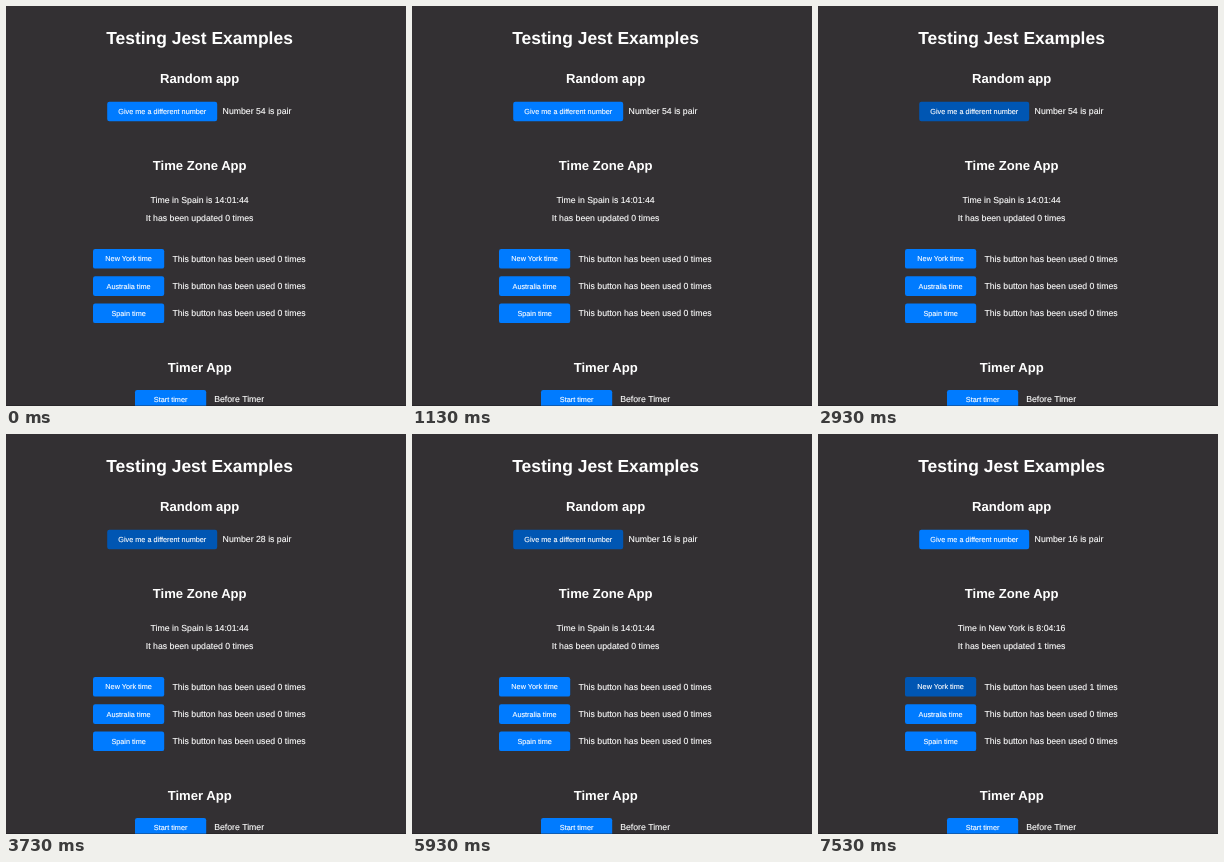
Recreate the animation shown at these times as an HTML page. Size 400 by 400 pixels, loop 8 s.

```html
<!DOCTYPE html>
<html lang="en">
<head>
<meta charset="utf-8">
<title>Testing Jest Examples</title>
<style>
html, body { margin: 0; width: 100%; height: 100%; overflow: hidden; background: #333033; }
svg { display: block; width: 100vw; height: 100vh; }
text {
  font: 8.72px "Liberation Sans", Arial, sans-serif;
  fill: #fff; stroke: #fff; stroke-width: .12px;
  text-rendering: geometricPrecision;
}
.mid, h1, .h1, .h2, .label { text-anchor: middle; }
.h1 { font-size: 17.44px; font-weight: bold; stroke: none; }
.h2 { font-size: 13.08px; font-weight: bold; stroke: none; }
.label { font-size: 7.27px; }
rect.btn { fill: #007bff; height: 19.6px; rx: 2.2px; }

/* hover states */
.random { animation: hover-random 8s linear infinite; }
.york { animation: hover-york 8s linear infinite; }
@keyframes hover-random {
  0%, 33.5% { fill: #007bff; }
  36.4%, 77.8% { fill: #0056b3; }
  80.4%, 100% { fill: #007bff; }
}
@keyframes hover-york {
  0%, 87.9% { fill: #007bff; }
  90%, 100% { fill: #0056b3; }
}

/* text states, each visible for its part of the loop */
.n1, .n2, .n3, .n4, .n5, .before, .after { animation: 8s step-end infinite; }
.n1 { animation-name: n1; }
.n2 { animation-name: n2; }
.n3 { animation-name: n3; }
.n4 { animation-name: n4; }
.n5 { animation-name: n5; }
.before { animation-name: before; }
.after { animation-name: after; }
@keyframes n1 { 0% { opacity: 1; } 46.6%, 100% { opacity: 0; } }
@keyframes n2 { 0% { opacity: 0; } 46.6% { opacity: 1; } 59.1%, 100% { opacity: 0; } }
@keyframes n3 { 0% { opacity: 0; } 59.1% { opacity: 1; } 65.85%, 100% { opacity: 0; } }
@keyframes n4 { 0% { opacity: 0; } 65.85% { opacity: 1; } 74.1%, 100% { opacity: 0; } }
@keyframes n5 { 0% { opacity: 0; } 74.1%, 100% { opacity: 1; } }
@keyframes before { 0% { opacity: 1; } 94.1%, 100% { opacity: 0; } }
@keyframes after { 0% { opacity: 0; } 94.1%, 100% { opacity: 1; } }
</style>
</head>
<body>
<svg viewBox="0 0 400 400">
  <rect width="400" height="400" fill="#333033"/>
  <rect y="399" width="400" height="1" fill="#29272a"/>

  <text class="h1" x="193.5" y="38">Testing Jest Examples</text>

  <text class="h2" x="193.7" y="77.2">Random app</text>
  <rect class="btn random" x="101.2" y="95.7" width="110"/>
  <text class="label" x="156.3" y="108">Give me a different number</text>
  <g>
    <text class="n1" x="216.6" y="108">Number 54 is pair</text>
    <text class="n2" x="216.6" y="108">Number 28 is pair</text>
    <text class="n3" x="216.6" y="108">Number 83 is odd</text>
    <text class="n4" x="216.6" y="108">Number 62 is pair</text>
    <text class="n5" x="216.6" y="108">Number 16 is pair</text>
  </g>

  <text class="h2" x="193.7" y="164">Time Zone App</text>
  <g class="before">
    <text class="mid" x="193.6" y="196.6">Time in Spain is 14:01:44</text>
    <text class="mid" x="193.6" y="215">It has been updated 0 times</text>
    <text x="166.4" y="255.7">This button has been used 0 times</text>
  </g>
  <g class="after">
    <text class="mid" x="193.6" y="196.6">Time in New York is 8:04:16</text>
    <text class="mid" x="193.6" y="215">It has been updated 1 times</text>
    <text x="166.4" y="255.7">This button has been used 1 times</text>
  </g>

  <rect class="btn york" x="87" y="243" width="71.2"/>
  <text class="label" x="122.6" y="255.3">New York time</text>
  <rect class="btn" x="87" y="270.3" width="71.2"/>
  <text class="label" x="122.6" y="282.6">Australia time</text>
  <text x="166.4" y="283">This button has been used 0 times</text>
  <rect class="btn" x="87" y="297.5" width="71.2"/>
  <text class="label" x="122.6" y="309.8">Spain time</text>
  <text x="166.4" y="310.2">This button has been used 0 times</text>

  <text class="h2" x="193.7" y="366.3">Timer App</text>
  <rect class="btn" x="129" y="384" width="71.2"/>
  <text class="label" x="164.6" y="396.3">Start timer</text>
  <text x="208.2" y="396.4">Before Timer</text>
  <rect y="399" width="400" height="1" fill="#29272a" opacity=".35"/>
</svg>
</body>
</html>
```
